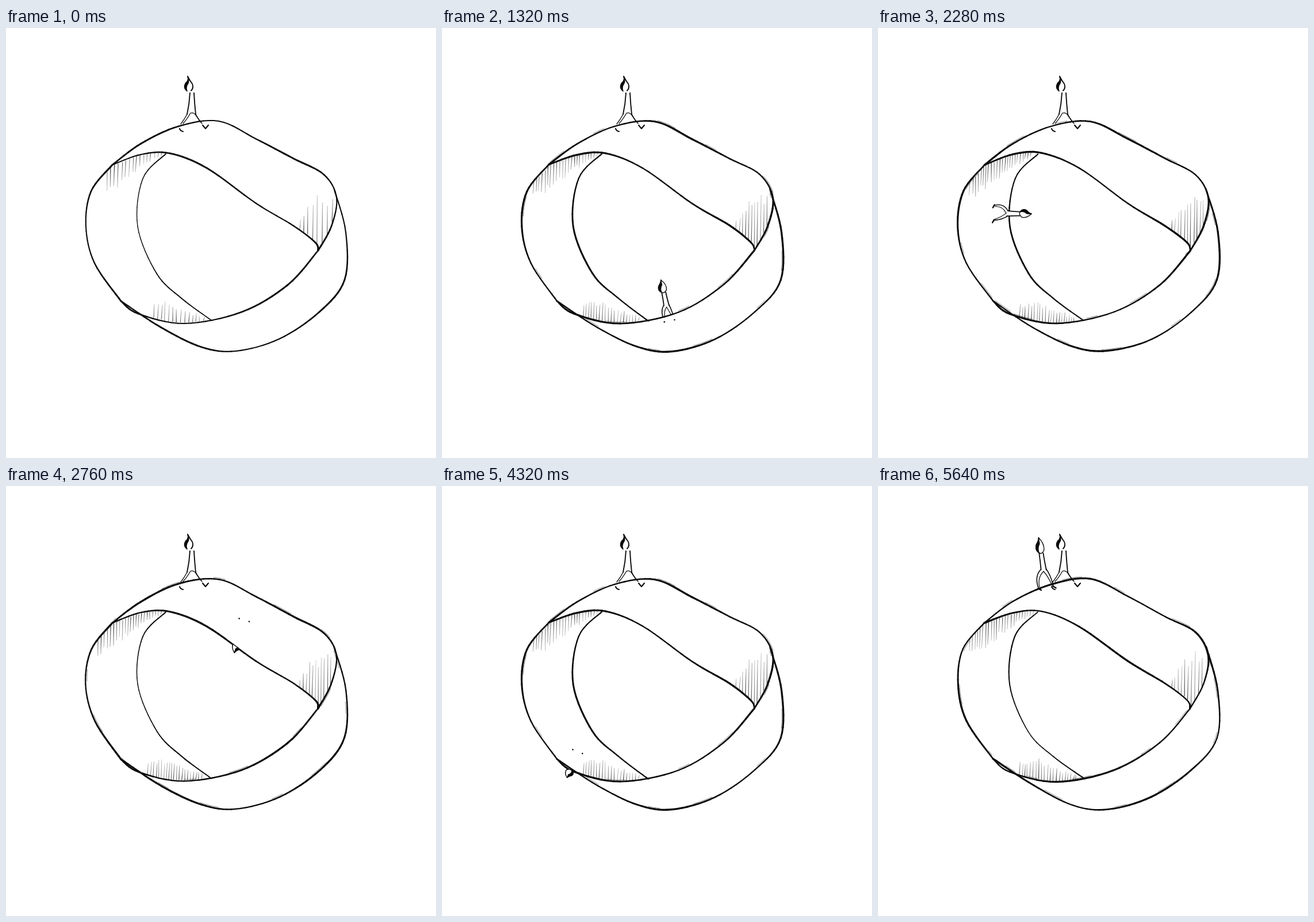
Recreate the animation shown at these times as an HTML page with a canvas. Size 748 px wide and 748 px high, loop 5.76 s.

```html
<!DOCTYPE html>
<html lang="en">
<head>
<meta charset="utf-8">
<title>Walking the one-sided strip</title>
<style>
  html, body { margin: 0; width: 100%; height: 100%; overflow: hidden; background: #fff; }
  canvas { display: block; width: 100vw; height: 100vh; }
</style>
</head>
<body>
<canvas id="stage" width="748" height="748"></canvas>
<script>
const ctx = document.getElementById('stage').getContext('2d');
const SIZE = 748, STEP = 120, STEPS = 48, REDRAWS = 5, FINE = 8, INK = '#0b0b0b';

// Key points of the strip's edges
const EDGES = {
  top: [[185, 238], [235, 201], [300, 171], [370, 162], [435, 193], [500, 227], [553, 255], [575, 295], [566, 345], [543, 387]],
  low: [[543, 387], [490, 447], [410, 494], [310, 514], [230, 497], [200, 475]],
  left: [[200, 475], [154, 409], [139, 345], [148, 284], [185, 238]],
  inner: [[185, 238], [235, 220], [285, 218], [350, 244], [435, 305], [500, 344], [538, 373], [543, 387]],
  back: [[278, 219], [238, 262], [229, 345], [262, 427], [305, 470], [358, 509]],
  outer: [[571, 281], [591, 355], [589, 438], [545, 494], [475, 541], [400, 562], [340, 555], [270, 521], [200, 475]]
};

// Evenly timed stops of the walk: feet x, feet y, lean in degrees, height
const WALK = [
  [325, 175, -96, 88], [450, 232, -90, 78], [575, 387, -137, 72], [480, 475, -118, 74],
  [355, 516, -93, 72], [260, 484, -65, 71], [193, 372, -18, 68], [262, 232, 45, 64],
  [485, 250, 119, 58], [580, 335, 20, 58], [505, 473, 55, 70], [372, 536, 83, 62],
  [236, 462, 112, 49], [185, 385, 165, 30], [183, 290, 213, 32], [240, 212, 252, 86]
];

const noise = (a, b, c = 0) => {
  const n = Math.sin(a * 12.9898 + b * 78.233 + c * 37.719) * 43758.5453;
  return n - Math.floor(n);
};

// Catmull-Rom blend of four points of any dimension
const blend = (a, b, c, d, t) => b.map((v, j) => 0.5 * (2 * v + (c[j] - a[j]) * t +
  (2 * a[j] - 5 * v + 4 * c[j] - d[j]) * t * t +
  (3 * v - a[j] - 3 * c[j] + d[j]) * t * t * t));

// Smooth edge, its key points nudged a little per drawing
function curve(keys, seed, amount) {
  const pts = keys.map(([x, y]) =>
    [x + (noise(x, y, seed) - 0.5) * amount, y + (noise(y, x, seed) - 0.5) * amount]);
  const last = pts.length - 1, at = i => pts[Math.max(0, Math.min(last, i))], out = [];
  for (let i = 0; i < last * FINE; i++) {
    const k = Math.floor(i / FINE);
    out.push(blend(at(k - 1), at(k), at(k + 1), at(k + 2), i / FINE - k));
  }
  return [...out, pts[last]];
}

function pose(step) {
  const n = WALK.length, u = step / STEPS * n, k = Math.floor(u);
  const at = i => {
    const [x, y, lean, h] = WALK[(i + n) % n];
    return [x, y, lean + 360 * Math.floor(i / n), h];
  };
  return blend(at(k - 1), at(k), at(k + 1), at(k + 2), u - k);
}

function line(x1, y1, x2, y2, width, color = INK) {
  ctx.strokeStyle = color;
  ctx.lineWidth = width;
  ctx.beginPath();
  ctx.moveTo(x1, y1);
  ctx.lineTo(x2, y2);
  ctx.stroke();
}

function stroke(d, width, fill) {
  const p = new Path2D(d);
  if (fill) { ctx.fillStyle = fill; ctx.fill(p); }
  ctx.strokeStyle = INK;
  ctx.lineWidth = width;
  ctx.stroke(p);
}

// Brush line whose weight swells along its length
function brush(pts, width, seed) {
  for (let i = 1; i < pts.length; i++) {
    line(...pts[i - 1], ...pts[i], width * (1 + 0.18 * Math.sin(i * 0.2 + seed * 2)));
  }
}

// Broken hairline beside an edge
function scratch(pts, seed, side) {
  ctx.save();
  ctx.setLineDash([34, 60, 20, 95]);
  ctx.lineDashOffset = seed * 53;
  ctx.strokeStyle = 'rgba(20,20,20,.6)';
  ctx.lineWidth = 0.8;
  ctx.beginPath();
  for (let i = 1; i < pts.length; i++) {
    const [x, y] = pts[i], dx = x - pts[i - 1][0], dy = y - pts[i - 1][1];
    const k = side * 2.6 / (Math.hypot(dx, dy) || 1);
    ctx.lineTo(x + dy * k, y - dx * k);
  }
  ctx.stroke();
  ctx.restore();
}

// Fading strokes that leave an edge, longest at the peak
function hatch(edge, from, to, gap, peak, height, slope, seed) {
  const dir = Math.sign(height);
  for (let x = from, i = 0; x < to; x += gap * (0.8 + 0.4 * noise(i, seed, 5)), i++) {
    const y = edge.reduce((p, q) => Math.abs(q[0] - x) < Math.abs(p[0] - x) ? q : p)[1];
    const len = Math.max(7, Math.abs(height) - slope * Math.abs(x - peak)) * (0.75 + 0.3 * noise(i, seed, 9));
    const end = y + dir * len, fade = ctx.createLinearGradient(0, y, 0, end);
    fade.addColorStop(0, `rgba(20,20,20,${0.6 + 0.35 * noise(i, seed, 3)})`);
    fade.addColorStop(1, 'rgba(20,20,20,.25)');
    line(x, y + dir * 2, x - 2 * dir * noise(i, seed, 2), end, 0.8 + 0.6 * noise(i, seed, 7), fade);
  }
}

function standing() {
  stroke('M316 84Q320 92 324 97Q327 104 322 109', 1.9);
  stroke('M316 85Q318 91 313 95Q307 104 315 110Q312 103 317 96Q319 91 316 85Z', 1.4, INK);
  stroke('M320 113Q319 132 315 150M327 113Q328 132 330 150', 1.9);
  stroke('M315 150Q311 158 304 167M321 148Q314 160 308 166M321 148Q327 146 331 153L339 164', 1.3);
  stroke('M330 150Q335 160 341 166', 1.6);
  stroke('M302 175Q303 179 308 180M342 169L347 175L352 169', 2.1);
}

const polygon = (...parts) => new Path2D('M' + parts.flat().map(p => p.join(' ')).join('L') + 'Z');

// Part of the strip that covers the walker
function cover(step, e) {
  if (step >= 6 && step < 15) return polygon(e.low, e.outer.slice().reverse());
  if (step >= 20 && step < 28) return polygon(e.top, e.inner.slice().reverse());
  if (step >= 35 && step < 44) return polygon(e.low.slice(-21), e.left, e.inner.slice(0, 2 * FINE), e.back);
  return null;
}

function walker(step, e) {
  const [x, y, lean, h] = pose(step), hidden = cover(step, e), s = hidden ? 9 : 13;
  const c = Math.cos(lean * Math.PI / 180), n = Math.sin(lean * Math.PI / 180);
  // a runs across the body in pixels, u runs from feet to tip
  const P = (a, u) => `${(x - a * n + c * h * u).toFixed(1)} ${(y + a * c + n * h * u).toFixed(1)}`;

  ctx.save();
  if (hidden) {
    const open = new Path2D();
    open.rect(0, 0, SIZE, SIZE);
    open.addPath(hidden);
    ctx.clip(open, 'evenodd');
  }
  ctx.fillStyle = '#fff';
  ctx.fill(new Path2D(`M${P(-4, .38)}L${P(-4, .7)}L${P(5, .7)}L${P(5, .38)}Z`));
  stroke(`M${P(0, 1)}Q${P(9, .86)} ${P(6, .74)}Q${P(2, .68)} ${P(-1, .69)}Q${P(-10, .75)} ${P(-6, .87)}Q${P(-1, .94)} ${P(0, 1)}Z`, 1.4, '#fff');
  stroke(`M${P(0, 1)}Q${P(0, .93)} ${P(-5, .88)}Q${P(-10, .78)} ${P(-3, .7)}Q${P(-5, .8)} ${P(0, .88)}Z`, 1.4, INK);
  stroke(`M${P(-3, .69)}Q${P(-3, .55)} ${P(-4, .38)}M${P(4, .69)}Q${P(4, .55)} ${P(5, .36)}`, 1.8);
  for (const side of [-1, 1]) {
    const knee = s * (1.1 + 0.25 * Math.sin(step * Math.PI / 2) * side);
    stroke(`M${P(5 * side, .38)}Q${P(knee * side, .26)} ${P(s * side, .03)}`, 1.6);
    stroke(`M${P(0, .34)}Q${P((knee - 5) * side, .24)} ${P((s - 2) * side, .05)}`, 1.2);
    if (!hidden) stroke(`M${P(s * side - 1, .03)}L${P(s * side + 4, -.01)}`, 2.4);
  }
  ctx.restore();
  if (hidden) for (const side of [-1, 1]) stroke(`M${P(s * side, 0)}L${P(s * side + .3, 0)}`, 2.4);
}

function draw(step) {
  const first = step === 0, seed = step % REDRAWS;
  ctx.fillStyle = '#fff';
  ctx.fillRect(0, 0, SIZE, SIZE);
  ctx.lineCap = ctx.lineJoin = 'round';

  const e = {};
  for (const name in EDGES) e[name] = curve(EDGES[name], seed, first ? 0 : 1.6);

  const gap = first ? 6.5 : 4.8;
  hatch([...e.left.slice(-FINE), ...e.inner], first ? 176 : 160, 271, gap, 190, 44, 0.45, seed);
  hatch([...e.inner.slice(-3 * FINE), ...e.top.slice(-2 * FINE)], 511, 568, gap * 1.2, 546, -95, 2.2, seed + 11);
  hatch(e.low, first ? 257 : 246, 344, gap, 278, -36, 0.4, seed + 23);

  const backWeight = first ? 0.65 : 0.85 + 0.25 * Math.cos(seed * 1.2);
  for (const name in e) {
    brush(e[name], (first ? 2.5 : 2.8) * (name === 'back' ? backWeight : 1), seed + name.length);
  }
  if (!first) {
    ['left', 'outer', 'low', 'top'].forEach((name, i) => scratch(e[name], seed + i, name === 'top' ? 1 : -1));
  }
  standing();
  if (!first) walker(step, e);
}

let shown = -1;
const began = performance.now();
function tick() {
  const step = Math.floor((performance.now() - began) / STEP) % STEPS;
  if (step !== shown) draw(shown = step);
  requestAnimationFrame(tick);
}
draw(shown = 0);
requestAnimationFrame(tick);
</script>
</body>
</html>
```
